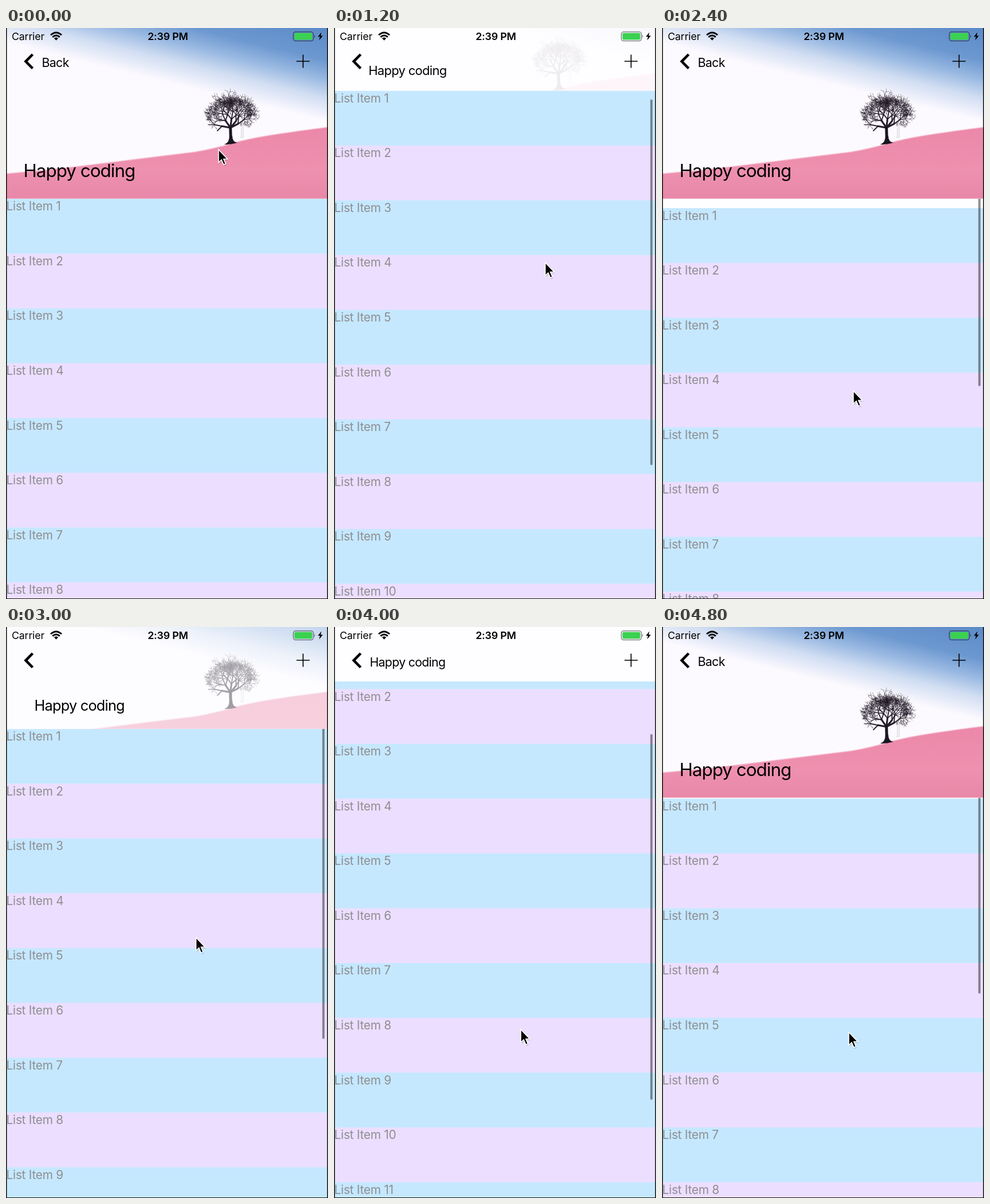
Recreate the animation shown at these times as an HTML page. Size 562 px wide and 996 px high, loop 4900 ms.

```html
<!DOCTYPE html>
<html lang="en">
<head>
<meta charset="utf-8">
<title>Collapsing header</title>
<style>
  html, body { margin: 0; width: 100%; height: 100%; overflow: hidden; background: #fefdff; }
  svg { display: block; }
  text { font-family: Inter, Roboto, "Liberation Sans", sans-serif; }
  #list text { font-size: 20.8px; letter-spacing: -.012em; fill: #8e8e93; }
  #title { font-size: 31.3px; letter-spacing: -.03em; }
  #back { font-size: 21.3px; letter-spacing: -.03em; }
  .status { font-size: 17.8px; letter-spacing: -.01em; }
</style>
</head>
<body>
<svg width="562" height="996" viewBox="0 0 562 996">
  <defs>
    <linearGradient id="sky" gradientUnits="userSpaceOnUse" x1="562" y1="0" x2="524" y2="155">
      <stop offset="0" stop-color="#5c8ac7"/>
      <stop offset=".35" stop-color="#6c98d0"/>
      <stop offset=".55" stop-color="#98b8e1"/>
      <stop offset=".75" stop-color="#d0ddf2"/>
      <stop offset="1" stop-color="#fdfaff"/>
    </linearGradient>
    <linearGradient id="field" x1="0" y1="0" x2="0" y2="1">
      <stop offset="0" stop-color="#ec88a9"/>
      <stop offset=".6" stop-color="#ee90af"/>
      <stop offset="1" stop-color="#e888a8"/>
    </linearGradient>
  </defs>

  <rect width="562" height="996" fill="#fefdff"/>
  <g id="list"></g>
  <rect id="bar" x="552" width="4" rx="2" fill="#000" fill-opacity=".42"/>

  <svg id="head" width="562" height="298">
    <rect width="562" height="298" fill="#fefdff"/>
    <g id="photo">
      <rect width="562" height="298" fill="url(#sky)"/>
      <path d="M0 254Q90 246 160 237T330 216Q365 210 395 201T480 184T562 173V298H0Z"
        fill="url(#field)" stroke="#f8cbd9" stroke-opacity=".6" stroke-width="2"/>
      <g id="tree" fill="none" stroke="#1c1522" stroke-linecap="round"></g>
      <path d="M381 203Q390 200 390 188H395Q395 199 404 200Q392 204 381 203Z" fill="#1c1522"/>
      <path d="M411 165V190M414 165V190M409 191H415" fill="none" stroke="#8d8290" stroke-width=".4"/>
    </g>
  </svg>

  <text id="back" x="62.5" y="67.5">Back</text>
  <text id="title">Happy coding</text>
  <path d="M46.5 46L34.5 58.3L46.5 70.5" fill="none" stroke="#000" stroke-width="4.6"/>
  <path d="M507 58H530M518.5 46.5V69.5" stroke="#000" stroke-width="1.7"/>

  <text class="status" x="10" y="21">Carrier</text>
  <text class="status" x="282.5" y="21" text-anchor="middle" font-weight="600">2:39 PM</text>
  <g fill="none" stroke="#000" stroke-width="2.9">
    <path d="M78 12.2Q87.5 3.6 97 12.2"/>
    <path d="M81.3 15.8Q87.5 10.4 93.7 15.8"/>
    <path d="M84 18L87.5 21.8L91 18Q87.5 15.2 84 18Z" fill="#000" stroke="none"/>
  </g>
  <rect x="501.5" y="6.8" width="35" height="15.8" rx="4" fill="none" stroke="#000" stroke-opacity=".48" stroke-width="1.5"/>
  <rect x="503.5" y="8.8" width="31" height="11.8" rx="2" fill="#3bd151"/>
  <path d="M538 11.8Q540.5 14.7 538 17.6Z" fill="#000" fill-opacity=".5"/>
  <path d="M550.5 7.5L544.3 15.3H548L546.5 21.5L553 13.4H549.2Z"/>

  <g id="cursor">
    <path d="M1 2V25L6.2 20.2L10 29L14 27.3L10.3 18.7H17.3Z" fill="#000" opacity=".16"/>
    <path d="M0 0V22.6L5.1 17.8L8.8 26.4L12.4 24.9L8.8 16.4H15.6Z" fill="#000" stroke="#fff" stroke-width="1.5"/>
  </g>
  <path d="M0 0H1.5V995H560.5V0H562V996H0Z" fill="#111"/>
</svg>

<script>
const LOOP = 4900, STEP = 100, FULL = 298, SMALL = 95, ROW = 95.57;
const $ = id => document.getElementById(id);
const set = (id, attrs) => {
  for (const name in attrs) $(id).setAttribute(name, attrs[name]);
};
const mix = (a, b, p) => a + (b - a) * p;

// Turning points of each swipe: [time, scroll] and [time, x, y]
const swipes = [
  [0, 0], [655, 0], [1770, 391], [2300, -19], [2700, 0],
  [2800, 0], [3440, 541], [3620, 541], [4420, -14], [LOOP, 0]
];
const pointer = [
  [0, 371, 212], [600, 370, 597], [1615, 368, 304], [2400, 334, 633],
  [2800, 334, 633], [3420, 324, 246], [4000, 326, 702], [LOOP, 326, 707]
];

// Every move between two turning points eases in and out
function pose(points, t) {
  const next = points.findIndex(point => point[0] > t);
  const from = points[next - 1], to = points[next];
  const u = (t - from[0]) / (to[0] - from[0]);
  const eased = (1 - Math.cos(Math.PI * u)) / 2;
  return from.slice(1).map((v, i) => mix(v, to[i + 1], eased));
}

function buildList() {
  let rows = '';
  for (let i = 0; i < 13; i++) {
    const y = i * ROW;
    rows += `<rect y="${y}" width="562" height="${ROW + .3}" fill="${i % 2 ? '#ecdeff' : '#c5e8ff'}"/>
      <text x="0.6" y="${y + 20.3}">List Item ${i + 1}</text>`;
  }
  $('list').innerHTML = rows;
}

function buildTree() {
  const DEPTH = 8;
  let seed = 23;
  const rand = () => (seed = seed * 16807 % 2147483647) / 2147483647;
  const spread = size => (rand() - .5) * size;
  const paths = Array(DEPTH).fill('');
  const inCrown = (x, y) => ((x - 393) / 50) ** 2 + ((y - 147) / 42) ** 2 < mix(.7, 1.05, rand());

  function grow(x, y, angle, length, depth) {
    const x2 = x + Math.sin(angle) * length, y2 = y - Math.cos(angle) * length;
    if (depth === DEPTH || depth && !inCrown(x2, y2)) return;
    paths[depth] += `M${x.toFixed(1)} ${y.toFixed(1)}L${x2.toFixed(1)} ${y2.toFixed(1)}`;
    if (!depth) {
      for (let i = -2; i <= 2; i++) grow(x2, y2, i * .62 + spread(.3), 15, 1);
      return;
    }
    // One leader carries on, the others fork off to the sides
    const side = rand() < .5 ? -1 : 1;
    grow(x2, y2, angle + spread(.5), length * .87, depth + 1);
    grow(x2, y2, angle + side * mix(.5, 1.1, rand()), length * .75, depth + 1);
    if (rand() < .55) grow(x2, y2, angle - side * mix(.5, 1.1, rand()), length * .7, depth + 1);
  }
  grow(392.5, 200, -.03, 26, 0);
  $('tree').innerHTML = paths.map((d, i) =>
    `<path d="${d}" stroke-width="${Math.max(.55, 5 * .62 ** i)}" opacity="${1 - i * .04}"/>`).join('');
}

function draw(t) {
  const [scroll] = pose(swipes, t);
  const [x, y] = pose(pointer, t);
  const shift = Math.max(0, scroll);
  const p = Math.min(1, shift / (FULL - SMALL));

  set('list', { transform: `translate(0 ${FULL - scroll})` });
  set('bar', { y: 3 + shift * .6437, height: 638 + Math.min(0, scroll), opacity: t < 700 ? 0 : 1 });
  set('head', { height: mix(FULL, SMALL, p) });
  set('photo', { transform: `translate(0 ${-shift / 2})`, opacity: 1 - p });
  set('back', { opacity: Math.max(0, 1 - 2 * p) });
  set('title', { transform: `translate(${mix(30.5, 62.5, p)} ${mix(259.5, 68.5, p)}) scale(${mix(1, .677, p)})` });
  set('cursor', { transform: `translate(${x} ${y})` });
}

buildList();
buildTree();
const start = performance.now();
(function tick() {
  const t = (performance.now() - start) % LOOP;
  draw(Math.floor(t / STEP) * STEP);
  requestAnimationFrame(tick);
})();
</script>
</body>
</html>
```
